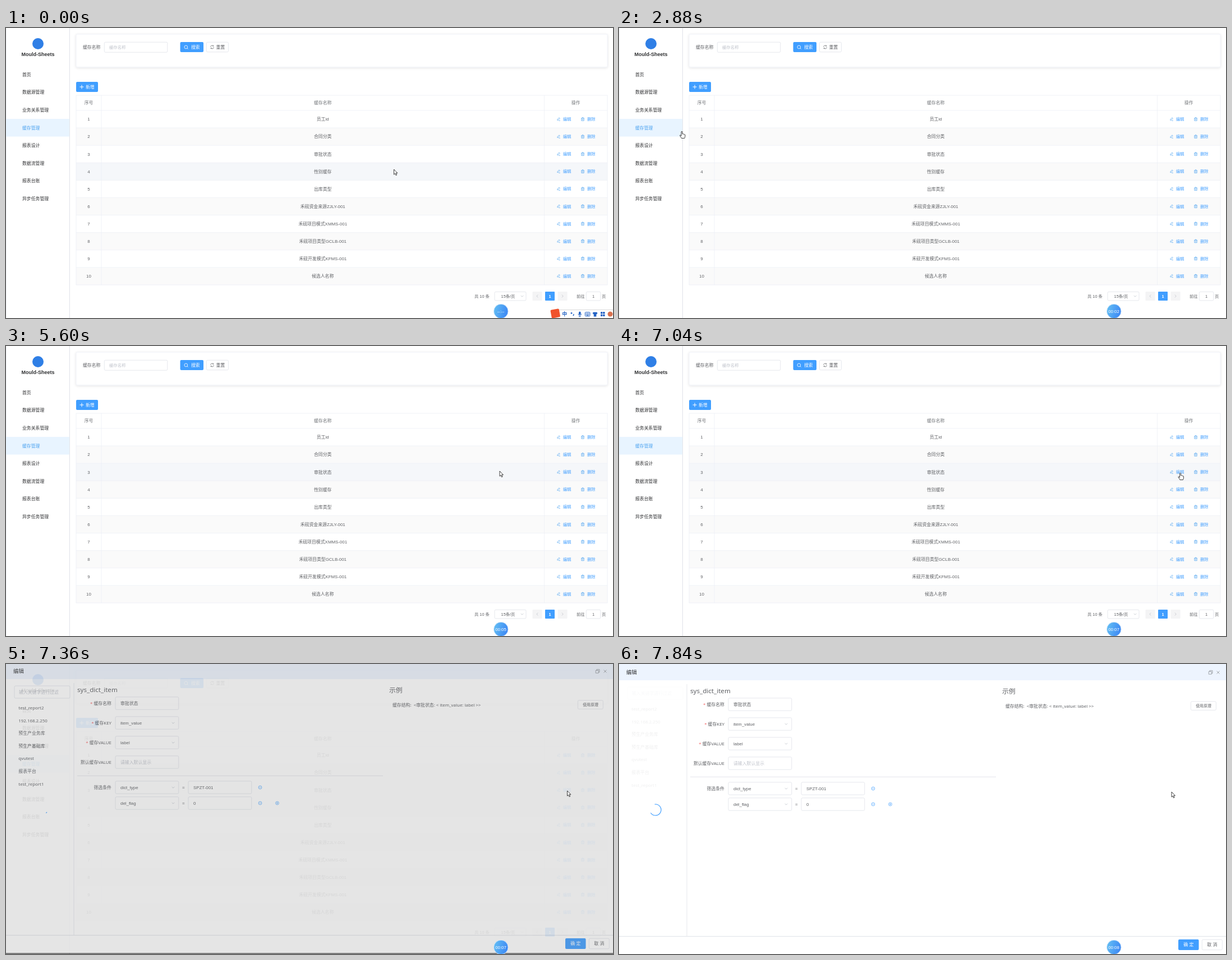
Write an HTML page that moves like this. It is 1082 px wide and 517 px high and loops after 8 s.

```html
<!DOCTYPE html>
<html lang="zh-CN">
<head>
<meta charset="utf-8">
<title>缓存管理</title>
<style>
html, body { margin: 0; width: 100%; height: 100%; overflow: hidden; background: #fff; }
svg { display: block; width: 100%; height: 100%; }
text { font-family: "Liberation Sans", "Noto Sans CJK SC", "Noto Sans CJK", sans-serif; white-space: pre; }
.ui { font-family: "Noto Sans", "Noto Sans CJK SC", "Noto Sans CJK", sans-serif; }
</style>
</head>
<body>
<svg id="stage" viewBox="0 0 1082 517"></svg>
<script>
const LOOP = 8000, STEP = 160;
const BLUE = '#409eff', INK = '#606266', DARK = '#303133', PALE = '#c0c4cc', EDGE = '#dcdfe6', GRID = '#ebeef5';
const FONT = 7.89, SMALL = 7.33;
const ROW_TOP = 147, ROW_H = 31.1;

// Markup helpers; text is placed by its vertical centre.
const text = (x, y, s, fill = INK, size = FONT, attrs = '') =>
  `<text x="${x}" y="${y + size * 0.37}" font-size="${size}" fill="${fill}" ${attrs}>${s}</text>`;
const MID = 'text-anchor="middle"', END = 'text-anchor="end" class="ui"', UI = 'class="ui"';
const rect = (x, y, w, h, fill, attrs = '') =>
  `<rect x="${x}" y="${y}" width="${w}" height="${h}" fill="${fill}" ${attrs}/>`;
const box = (x, y, w, h, stroke = EDGE) => rect(x, y, w, h, '#fff', `rx="2" stroke="${stroke}" stroke-width=".7"`);
const button = (x, y, w, h) => rect(x, y, w, h, BLUE, 'rx="2"');
const line = (x1, y1, x2, y2, stroke = GRID, width = 0.7) =>
  `<path d="M${x1} ${y1}L${x2} ${y2}" stroke="${stroke}" stroke-width="${width}"/>`;
const icon = (x, y, d, stroke = INK, width = 0.8) =>
  `<path transform="translate(${x} ${y})" d="${d}" fill="none" stroke="${stroke}" stroke-width="${width}"/>`;
const circle = (x, y, r, fill) => `<circle cx="${x}" cy="${y}" r="${r}" fill="${fill}"/>`;

const ICONS = {
  search: 'M2.7 0A2.9 2.9 0 1 1-3.1 0A2.9 2.9 0 1 1 2.7 0M1.9 2L3.6 3.6',
  reset: 'M-2.8-.4A2.8 2.8 0 0 1 2.3-1.7V-3M2.3-1.7H.9M2.8 .4A2.8 2.8 0 0 1-2.3 1.7V3M-2.3 1.7H-.9',
  plus: 'M-3.5 0H3.5M0-3.5V3.5',
  edit: 'M-2.2 2L-2 .2L.9-2.7L2.3-1.4L-.6 1.6ZM0 2.6H2.9',
  trash: 'M-2.9-1.6H2.9M-1-1.8V-2.8H1V-1.8M-2.2-1.6V2.8H2.2V-1.6M-.7-.2V1.5M.7-.2V1.5',
  down: 'M-2.3-1.1L0 1.2L2.3-1.1',
  left: 'M1.2-2.4L-1.2 0L1.2 2.4',
  right: 'M-1.2-2.4L1.2 0L-1.2 2.4',
  close: 'M-2.5-2.5L2.5 2.5M2.5-2.5L-2.5 2.5',
  windows: 'M-3.3-1.5H1.7V3.2H-3.3ZM-1.7-1.5V-3.3H3.4V1.6H1.7',
  minus: 'M2.9 0A2.9 2.9 0 1 1-2.9 0A2.9 2.9 0 1 1 2.9 0M-1.4 0H1.4',
  add: 'M2.9 0A2.9 2.9 0 1 1-2.9 0A2.9 2.9 0 1 1 2.9 0M-1.4 0H1.4M0-1.4V1.4'
};

function sidebar() {
  const items = ['首页', '数据源管理', '业务关系管理', '缓存管理', '报表设计', '数据流管理', '报表台账', '异步任务管理'];
  return line(0.4, 0, 0.4, 517) + line(113.4, 0, 113.4, 517, EDGE, 0.9)
    + circle(57, 28, 10, '#2f7fe6')
    + text(57, 47, 'Mould-Sheets', DARK, 9.016, MID + ' font-weight="bold"')
    + rect(0, 162, 113, 31.5, '#e8f4ff')
    + items.map((s, i) => text(29, 83 + i * 31.56, s, i === 3 ? '#4da3f0' : DARK)).join('');
}

function searchCard() {
  return rect(125, 11, 947, 58.7, '#fff', 'rx="2" stroke="#ebeef5" stroke-width=".8" filter="url(#shadow)"')
    + text(137, 34, '缓存名称') + box(175.3, 25.3, 112.5, 18) + text(184, 34, '缓存名称', PALE, SMALL)
    + button(310.5, 25, 41.5, 18) + icon(321, 34, ICONS.search, '#fff') + text(330, 34, '搜索', '#fff')
    + box(357.4, 25.3, 39, 17.5) + icon(367.5, 34, ICONS.reset) + text(374.5, 34, '重置')
    + button(125, 96, 39, 18) + icon(135, 105, ICONS.plus, '#fff', 1) + text(142, 105, '新增', '#fff');
}

function table() {
  const names = ['员工id', '合同分类', '审批状态', '性别缓存', '出库类型', '禾砚资金来源ZJLY-001',
    '禾砚项目模式XMMS-001', '禾砚项目类型GCLB-001', '禾砚开发模式KFMS-001', '候选人名称'];
  const rows = names.map((name, i) => {
    const top = ROW_TOP + i * ROW_H, y = 162.5 + i * 31.06;
    return rect(125, top, 947, ROW_H, i % 2 ? '#fafafa' : '#fff', 'class="row"') + line(125, top, 1072, top)
      + text(147.5, y, i + 1, INK, FONT, MID) + text(564.7, y, name, INK, FONT, MID)
      + icon(985, y, ICONS.edit, '#4da3f0', 0.7) + text(992.8, y, '编辑', BLUE, SMALL)
      + icon(1028, y, ICONS.trash, '#4da3f0', 0.7) + text(1036, y, '删除', BLUE, SMALL);
  }).join('');
  const heads = [[147.5, '序号'], [564.7, '缓存名称'], [1015.5, '操作']];
  return rows + heads.map(([x, s]) => text(x, 133, s, '#73767a', FONT, MID)).join('')
    + rect(125, 120, 947, 338, 'none', `stroke="${GRID}" stroke-width=".8"`)
    + line(170, 120, 170, 458) + line(959.5, 120, 959.5, 458);
}

function pagination() {
  return text(835, 478, '共 10 条', INK, SMALL)
    + box(871, 470.3, 56, 15.6) + text(895, 478, '15条/页', INK, SMALL, MID) + icon(920, 478, ICONS.down, PALE)
    + rect(938.5, 470, 17, 16, '#f4f4f5', 'rx="1"') + icon(947, 478, ICONS.left, PALE)
    + rect(961, 470, 17, 16, BLUE, 'rx="1"') + text(969.5, 478, '1', '#fff', SMALL, MID + ' font-weight="bold"')
    + rect(983.5, 470, 17, 16, '#f4f4f5', 'rx="1"') + icon(992, 478, ICONS.right, PALE)
    + text(1017, 478, '前往', INK, SMALL) + box(1034.3, 470.3, 25.5, 15.6)
    + text(1047, 478, '1', INK, SMALL, MID) + text(1062, 478, '页', INK, SMALL);
}

function inputBar() {
  const c = '#2463c4';
  const dots = [[1061.7, 507.8], [1065.8, 507.8], [1061.7, 512.2], [1065.8, 512.2]];
  return rect(980, 502.5, 104, 16, '#fff', 'stroke="#cfcfcf" stroke-width=".8"')
    + rect(971.5, 501.5, 15.5, 15, '#f0532d', 'rx="2" transform="rotate(-10 979 509)"')
    + text(995.7, 510, '中', c, 9, MID + ' font-weight="bold"')
    + circle(1008, 508.3, 1.4, c) + icon(1011.5, 511, 'M0-1Q1.2 .3-.7 2', c, 1.5)
    + rect(1021, 505.5, 3.6, 6, c, 'rx="1.8"') + icon(1022.8, 510, 'M-3-.5A3 3 0 0 0 3-.5M0 2.5V4.5M-2 4.5H2', c)
    + rect(1032.3, 506.7, 8.6, 7, 'none', `rx="1" stroke="${c}"`)
    + icon(1036.6, 510, 'M-3-1H3M-3 .8H3M-2 2.3H2', c, 0.9)
    + `<path d="M1045.5 508L1048.5 506Q1050 508 1051.5 506L1054.5 508L1053 510.5L1052.3 510V514.5H1047.7V510L1047 510.5Z" fill="${c}"/>`
    + dots.map(([x, y]) => rect(x - 1.7, y - 1.8, 3.4, 3.6, c, 'rx=".7"')).join('')
    + circle(1077, 510, 4.5, '#d9714f');
}

function treePanel() {
  const nodes = ['test_report2', '192.168.2.250', '预生产业务库', '预生产基础库', 'qvutest', '报表平台', 'test_report1'];
  return box(15, 41, 99, 22) + text(23, 52, '输入关键字进行过滤', PALE, FONT, UI)
    + '<g id="empty">' + text(65, 86, '暂无数据', '#909399', FONT, MID) + '</g>'
    + '<g id="nodes">' + nodes.map((s, i) => text(22.3, 80 + i * 22.6, s, INK, FONT, UI)).join('') + '</g>'
    + rect(8, 36, 112, 448, '#fff', 'id="veil"')
    + '<path id="spinner" fill="none" stroke="#409eff" stroke-width="1.2" stroke-linecap="round"/>';
}

function dialogForm() {
  const field = (x, y, s, select, fill = INK) => box(x, y - 11.2, 112.8, 22.4) + text(x + 9, y, s, fill)
    + (select ? icon(x + 103, y, ICONS.down, PALE) : '');
  const label = (y, s, required) =>
    text(188, y, (required ? '<tspan fill="#f56c6c">* </tspan>' : '') + s, INK, FONT, END);
  const filter = (y, key, value) => field(195, y, key, true) + text(316.3, y, '=', INK, FONT, MID)
    + field(325, y, value) + icon(453, y, ICONS.minus, BLUE, 0.7);
  return text(127, 48, 'sys_dict_item', INK, 11.6, UI)
    + label(72, '缓存名称', true) + field(195, 72, '审批状态')
    + label(107, '缓存KEY', true) + field(195, 107, 'item_value', true)
    + label(142, '缓存VALUE', true) + field(195, 142, 'label', true)
    + label(177, '默认缓存VALUE') + field(195, 177, '请输入默认显示', false, PALE)
    + line(127, 201.3, 672, 201.3, EDGE, 0.8)
    + label(222, '筛选条件') + filter(222, 'dict_type', 'SPZT-001') + filter(250, 'del_flag', '0')
    + icon(483.5, 250, ICONS.add, BLUE, 0.7);
}

function dialog() {
  return rect(0, 0, 1082, 517, '#fff') + rect(0, 0, 1082, 29, '#edf4fe')
    + text(13, 14.5, '编辑', DARK, 9.4) + icon(1054.5, 15, ICONS.windows, '#909399') + icon(1068, 15, ICONS.close, '#909399')
    + line(121, 36, 121, 485, EDGE) + treePanel() + dialogForm()
    + text(683, 48.5, '示例', INK, 11.8, UI)
    + text(689, 75, '缓存结构:&#160; &lt;审批状态: &lt; item_value: label &gt;&gt;', INK, FONT, UI)
    + box(1019.3, 66.8, 45, 15.5) + text(1042, 74.5, '使用原理', INK, 6.9, MID)
    + line(0, 485.6, 1082, 485.6, EDGE, 0.9)
    + button(997, 491, 36.5, 19) + text(1015.3, 500.5, '确 定', '#fff', FONT, MID)
    + box(1039.3, 491.3, 36, 18.4) + text(1057.3, 500.5, '取 消', INK, FONT, MID);
}

const $ = id => document.getElementById(id);
$('stage').innerHTML = `<defs>
  <filter id="shadow" x="-5%" y="-30%" width="110%" height="170%">
    <feDropShadow dx="0" dy="1.1" stdDeviation="2" flood-color="#000" flood-opacity=".12"/></filter>
  <linearGradient id="bubble" x1="0" y1=".3" x2="1" y2=".6">
    <stop offset="0" stop-color="#62bdf3"/><stop offset="1" stop-color="#3c87f4"/></linearGradient></defs>`
  + rect(0, 0, 1082, 517, '#fff') + sidebar() + searchCard() + table() + pagination()
  + rect(0, 0, 1082, 517, '#000', 'id="shade"') + `<g id="dialog">${dialog()}</g>`
  + `<g id="inputBar">${inputBar()}</g>`
  + '<circle cx="882.3" cy="505" r="12.8" fill="url(#bubble)" stroke="#d4e8fb" stroke-width=".9"/>'
  + text(882, 505, '', '#fff', FONT, MID + ' id="clock"')
  + `<g id="cursor" stroke="#111" stroke-width=".8" fill="#fff" stroke-linejoin="round">
    <path id="arrow" d="M0 0V9.2L2.1 7.3L3.6 10.7L5.1 10L3.6 6.7H6.4Z"/>
    <path id="hand" d="M-1 1Q0-.6 1 1V5Q2.2 4.2 2.8 5.2Q3.9 4.6 4.4 5.7Q5.8 5.4 5.8 7V9Q5.8 10.5 4.8 12.6H-.6Q-1.4 10.8-2.8 9Q-4 7.4-3.3 7Q-2.4 6.6-1 8.4Z"/></g>`;

// Rows of [time, ...values], interpolated linearly.
function track(keys, t) {
  const i = keys.findIndex(k => k[0] > t);
  if (i === 0) return keys[0].slice(1);
  if (i < 0) return keys[keys.length - 1].slice(1);
  const a = keys[i - 1], b = keys[i], p = (t - a[0]) / (b[0] - a[0]);
  return a.slice(1).map((v, k) => v + (b[k + 1] - v) * p);
}

const POINTER = [[0, 691.5, 252], [2080, 88, 181], [2720, 88, 181], [2880, 112, 184], [3360, 340, 197],
  [3840, 505, 204], [4320, 550.5, 206.5], [4960, 620, 222], [5600, 880, 223], [6080, 998, 224],
  [6400, 1000.5, 226], [7360, 1000.5, 226], [7840, 985, 228]];
// time, shade opacity, dialog opacity, dialog offset
const OPENING = [[7040, 0, 0, -20], [7200, 0.12, 0.1, -10], [7360, 0.5, 0.8, -2], [7520, 0.5, 1, 0]];
// time, veil opacity, arc start, arc sweep (degrees)
const LOADING = [[7360, 0, 40, 8], [7680, 0.9, 190, 165], [7840, 0.9, 265, 240]];

function arc(cx, cy, r, start, sweep) {
  const at = deg => [cx + r * Math.cos(deg * Math.PI / 180), cy + r * Math.sin(deg * Math.PI / 180)].join(' ');
  return `M${at(start)}A${r} ${r} 0 ${sweep > 180 ? 1 : 0} 1 ${at(start + sweep)}`;
}

const rows = [...document.querySelectorAll('.row')];
const show = (id, on) => $(id).setAttribute('visibility', on ? 'visible' : 'hidden');

function draw(t) {
  const [x, y] = track(POINTER, t);
  const opened = t >= 7200, loaded = t >= 7360;
  const hovered = x > 125 && x < 1072 ? Math.floor((y - ROW_TOP) / ROW_H) : -1;
  rows.forEach((row, i) => row.setAttribute('fill', i === hovered ? '#f5f7fa' : i % 2 ? '#fafafa' : '#fff'));

  const onMenu = x < 113 && y > 67 && y < 320;
  const onLink = x > 980 && x < 1050 && Math.abs(y - ROW_TOP - (hovered + 0.5) * ROW_H) < 5;
  const pointing = !opened && (onMenu || onLink);
  $('cursor').setAttribute('transform', `translate(${x} ${y})`);
  show('hand', pointing);
  show('arrow', !pointing);

  const seconds = Math.floor(t * 1.025 / 1000);
  $('clock').textContent = t < STEP ? '--:--' : '00:' + String(seconds).padStart(2, '0');
  show('inputBar', t < 1280);

  const [shade, opacity, offset] = track(OPENING, t);
  $('shade').setAttribute('opacity', shade);
  $('dialog').setAttribute('opacity', opacity);
  $('dialog').setAttribute('transform', `translate(0 ${offset})`);
  show('empty', !loaded);
  show('nodes', loaded);
  show('spinner', loaded);
  const [veil, start, sweep] = track(LOADING, t);
  $('veil').setAttribute('opacity', veil);
  $('spinner').setAttribute('d', arc(65, 260, 10, start, sweep));
}

const origin = performance.now();
function tick() {
  const t = Math.max(0, performance.now() - origin) % LOOP;
  draw(Math.floor(t / STEP) * STEP);
  requestAnimationFrame(tick);
}
tick();
</script>
</body>
</html>
```
